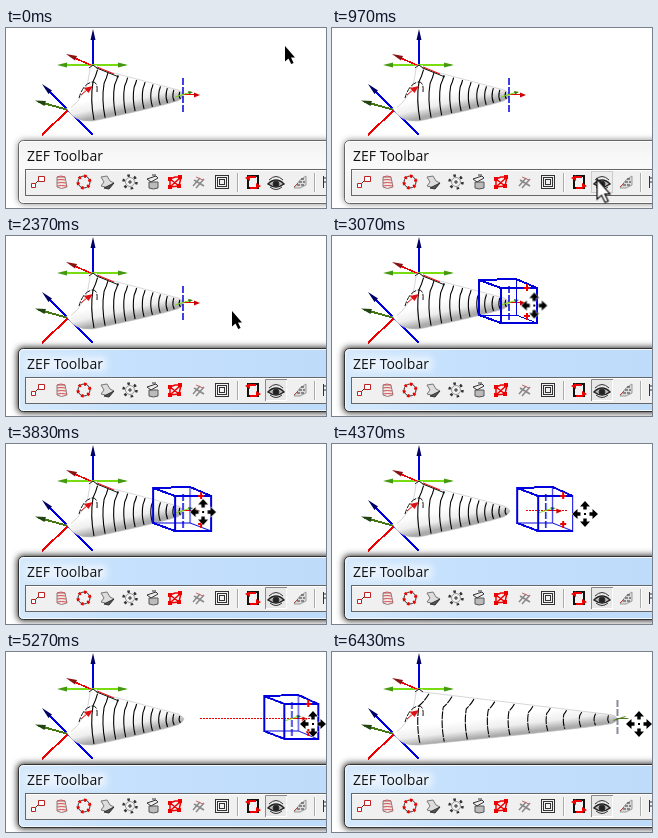
These frames come from a looping animation (320x180 px, 6870 ms). An HTML page:

```html
<!DOCTYPE html>
<html lang="en">
<head>
<meta charset="utf-8">
<title>Toolbar demo</title>
<style>
html, body { margin: 0; width: 100%; height: 100%; overflow: hidden; background: #fff; }
svg { display: block; width: 100vw; height: 100vh; }
text { font: 14px "Open Sans", "Noto Sans", sans-serif; fill: #111; }
.r { stroke: #e00; } .g { stroke: #7d1; } .b { stroke: #00d; } .k { stroke: #111; }
.ln { fill: none; stroke-width: 1; }
.crisp { shape-rendering: crispEdges; }
.ring { fill: none; stroke: #000; stroke-width: 1.1; }
.long .ring { stroke-dasharray: 8 1; }
.anim { animation: 6870ms linear infinite; }
.flip { animation: 6870ms step-end infinite; }

.active { animation-name: active; }
.idle { animation-name: idle; }
.hover { animation-name: hover; }
.pressed { animation-name: pressed; }
.short { animation-name: before; }
.long { animation-name: after; }
.frame { animation-name: frame; }
.dots { animation-name: dots; }
.group { animation-name: slide; transform-origin: 147px 0; }
.pointer { animation-name: pointer; }
.dark { animation-name: dark; }
.light { animation-name: light; }
.move { animation-name: move; }

@keyframes active { 0% { opacity: 0 } 23.29%, 100% { opacity: 1 } }
@keyframes idle { 0% { opacity: 1 } 23.29%, 100% { opacity: 0 } }
@keyframes hover { 0% { opacity: 0 } 10.5% { opacity: 1 } 24.745%, 100% { opacity: 0 } }
@keyframes pressed { 0% { opacity: 0 } 24.745%, 100% { opacity: 1 } }
@keyframes before { 0% { opacity: 1 } 93.595%, 100% { opacity: 0 } }
@keyframes after { 0% { opacity: 0 } 93.595%, 100% { opacity: 1 } }
@keyframes frame { 0% { opacity: 0 } 44.105% { opacity: 1 } 93.595%, 100% { opacity: 0 } }
@keyframes dark { 0% { opacity: 1 } 7.86% { opacity: 0 } 31.08% { opacity: 1 } 44.105%, 100% { opacity: 0 } }
@keyframes light { 0% { opacity: 0 } 7.86% { opacity: 1 } 31.08%, 100% { opacity: 0 } }
@keyframes move { 0% { opacity: 0 } 44.105%, 100% { opacity: 1 } }
/* the group shrinks slightly with distance */
@keyframes slide {
  0%, 55.75% { transform: translate(0, 0) scale(1, 1) }
  63.61%, 64.4% { transform: translate(38px, 0) scale(.96, 1) }
  65.502%, 66.521% { transform: translate(58px, 0) scale(.95, 1) }
  74.236%, 100% { transform: translate(111px, 0) scale(.93, 1) }
}
@keyframes dots {
  0%, 55.75% { width: 0 }
  63.61%, 64.4% { width: 41px }
  65.502%, 66.521% { width: 58px }
  74.236%, 93.594% { width: 110px }
  93.595%, 100% { width: 0 }
}
@keyframes pointer {
  0% { transform: translate(279px, 18px) }
  2.475% { transform: translate(279px, 18px); animation-timing-function: ease-in-out }
  11.208%, 14.1% { transform: translate(266px, 152px) }
  14.119% { transform: translate(265px, 151px) }
  27.656% { transform: translate(265px, 151px); animation-timing-function: ease-in-out }
  34.498%, 34.93% { transform: translate(226px, 75px) }
  37.409%, 37.846% { transform: translate(215px, 75px) }
  39.301%, 44.1% { transform: translate(200px, 71px) }
  44.105% { transform: translate(204px, 70px) }
  46.579%, 55.75% { transform: translate(197px, 68px) }
  63.61%, 64.4% { transform: translate(253px, 70px) }
  65.502%, 66.521% { transform: translate(262px, 70px) }
  74.236%, 100% { transform: translate(307px, 72px) }
}
</style>
</head>
<body>
<svg viewBox="0 0 320 180" preserveAspectRatio="none">
  <defs>
    <linearGradient id="skin" x1="0" y1="0" x2=".42" y2=".84">
      <stop offset=".66" stop-color="#fff"/><stop offset=".85" stop-color="#eee"/><stop offset="1" stop-color="#aaa"/>
    </linearGradient>
    <linearGradient id="glass" x1="0" y1="0" x2="1" y2="0">
      <stop offset="0" stop-color="#d6e9fb"/><stop offset=".35" stop-color="#c4e0fd"/><stop offset="1" stop-color="#bddbfa"/>
    </linearGradient>
    <linearGradient id="pale" x1="0" y1="0" x2="0" y2="1">
      <stop offset="0" stop-color="#f2f2f2"/><stop offset=".4" stop-color="#fafafa"/><stop offset="1" stop-color="#eee"/>
    </linearGradient>
    <filter id="blur" x="-10%" y="-30%" width="120%" height="160%"><feGaussianBlur stdDeviation="3"/></filter>
    <pattern id="dash" x="194" y="66" width="3" height="3" patternUnits="userSpaceOnUse"><path d="M0 0h2v1H0z" fill="#e00"/></pattern>
    <path id="arrow" d="M0 0V15.5L3.500 12.500L6.200 18L8.600 17L6 11.500H10Z"/>
    <path id="spike" d="M0-13L5-7.500H1.700V-4.500H-1.700V-7.500H-5Z"/>
  </defs>
  <rect width="320" height="180" fill="#fff"/>

  <!-- fixed axes behind the solid -->
  <g class="ln crisp">
    <path class="b" stroke-width="2" d="M87 38V8"/>
    <path class="g" stroke-width="2" d="M55 37H119"/>
    <path class="r" stroke-width="1.500" d="M64 28L87 38"/>
    <path class="b" stroke-width="2" d="M40 60L87 107"/>
    <path stroke="#471" stroke-width="2" d="M32 73.5L62 82"/>
    <path class="r" stroke-width="2" d="M36 107L62 82"/>
  </g>
  <path d="M87 1l2.500 11h-5zM36 56l10 6.500-3.500 3.500z" fill="#006"/>
  <path d="M51 37l10-2.500v5zM122 37l-10-2.500v5z" fill="#491"/>
  <path d="M60 26l11 2-2 4.500z" fill="#811"/>
  <path d="M29 72.500l11 .5-1.500 5z" fill="#241"/>

  <g class="flip short" id="short"></g>
  <g class="flip long" id="long"></g>
  <g class="flip short ln">
    <path class="k" d="M87 38.500L113 49"/>
    <path class="r" d="M90 38.500L108 46"/>
  </g>
  <path class="ln k" stroke-dasharray="6 1.500" d="M91 64Q92 53 86 54Q77 56 73 70"/>
  <path class="ln r" stroke-width="1.500" d="M75 67L82 61"/><path d="M87 58l-9 2 4.500 5z" fill="#d11"/>
  <path d="M84 37.500h7v3h-7zM60 80l5-1v6z" fill="#fff"/>
  <path class="ln k" d="M83 40l4-3 4 3"/>

  <rect class="anim dots" x="194" y="66" width="0" height="1" fill="url(#dash)"/>

  <!-- tip axes and their bounding box -->
  <g class="anim group">
    <g class="flip short ln">
      <path class="b" stroke-width="1.500" stroke-dasharray="7 2" d="M177 50V84"/>
      <path class="r" d="M177 66.500H190"/>
      <path class="g" d="M169 69L185 64"/>
      <path d="M194 67l-6-2.500v5z" fill="#c00"/>
      <path d="M182 63l5 1-4 2.500z" fill="#371"/>
    </g>
    <g class="flip long ln">
      <path stroke="#113" stroke-dasharray="7 2" d="M176.500 48V84"/>
      <path stroke="#471" d="M172 68.500L185 64.500M177 66.500H188"/>
    </g>
    <g class="flip frame ln crisp">
      <g class="b" stroke-width="2">
        <path d="M147 44L169 52H205V87H169L147 79ZM169 52V87M147 44L184 43L205 52"/>
        <path d="M184 43V79L205 87M147 79L184 79" stroke-width="1"/>
      </g>
      <path class="r" stroke-width="2" d="M195 48v7M192 52h6M195 77v7M192 80h6"/>
    </g>
  </g>

  <!-- tool window -->
  <rect class="flip idle" x="12" y="112" width="330" height="64" rx="6" fill="#888" filter="url(#blur)"/>
  <rect class="flip active" x="11" y="111" width="330" height="66" rx="6" fill="#333" filter="url(#blur)"/>
  <rect x="12.500" y="112.500" width="330" height="63" rx="5" fill="url(#pale)" stroke="#666"/>
  <rect class="flip active" x="12.500" y="112.500" width="330" height="63" rx="5" fill="url(#glass)" stroke="#333"/>
  <rect x="13.500" y="113.500" width="330" height="61" rx="4" fill="none" stroke="#fff" opacity=".8"/>
  <rect class="flip active" x="20" y="121" width="80" height="14" fill="#e8f3fe" filter="url(#blur)"/>
  <text x="21" y="133">ZEF Toolbar</text>
  <rect x="19.500" y="141.500" width="310" height="26" fill="#f0f0f0" stroke="#666"/>
  <path d="M20 142.500H320" stroke="#fff"/>
  <path d="M231.500 145v19M308.500 145v19" stroke="#aaa"/>
  <path d="M232.500 145v19M309.500 145v19" stroke="#fff"/>
  <rect class="flip hover" x="259.500" y="143.500" width="21" height="21" fill="#ececec" stroke="#ccc"/>
  <g class="flip pressed">
    <rect x="259.500" y="143.500" width="21" height="21" fill="#e8e8e8" stroke="#fff"/>
    <path d="M259.500 165V143.500H281" fill="none" stroke="#888"/>
  </g>

  <g fill="none" stroke="#333">
    <g transform="translate(32 154)"><path d="M-4 3L2-3"/><path stroke="#b22" fill="#fff" d="M-6.500 1.500h4v4h-4zM.5-5.500h6v5h-6z"/></g>
    <g transform="translate(55 154)"><path d="M-4-5L-4 5Q0 8 6 5L4-5Z" fill="#f3e6e6" stroke="#977"/><path stroke="#c55" d="M-4-5Q0-7 4-5M-4-2Q0-3 4-2M-4 1Q0 0 5 1M-4 4Q0 3 6 4"/></g>
    <g transform="translate(78 154)"><circle r="6"/><path class="r" stroke-width="3" stroke-dasharray="2.500 3.780" d="M0-6A6 6 0 1 1-.1-6"/></g>
    <g transform="translate(101 154)"><path d="M-6-5L0-6L3-1L7 1L2 6L-6 4L-3 0Z" fill="#ddd" stroke="#777"/><path d="M-3 6L7 1L2 7z" fill="#555"/></g>
    <g transform="translate(124 154)"><circle r="4.500" stroke="#999"/><circle r="6.500" stroke-width="2.500" stroke-dasharray="2.500 4.300"/><path d="M-2 0h4M0-2v4"/></g>
    <g transform="translate(147 154)"><path d="M-4 0H5V6Q0 8-4 6Z" fill="#bbb" stroke="#555"/><path d="M-6-3L3-6L5-4L-2 0ZM-1-7h4" fill="#eee"/></g>
    <g transform="translate(169 154)"><path class="r" stroke-width="1.500" d="M-5-3L0-5H6L4 4L-5 5ZM-5-3L4 4M6-5L-5 5"/><path d="M-7-5h4v4h-4zM-7 3h4v4h-4zM2 2h4v4H2zM3-7h4v4H3z" fill="#e00" stroke="none"/></g>
    <g transform="translate(193 154)"><path d="M-6 4L1-4M-3 6L5-3M-5-2L5 4" stroke="#888" stroke-width="1.500"/><path stroke="#b66" d="M-3-5l7 3"/></g>
    <g class="crisp" transform="translate(216 154)"><path d="M-6.500-6.500h13v13h-13zM-4.500-4.500h9v9h-9zM-2.500-2.500h5v5h-5z"/></g>
    <g transform="translate(247 154)"><path class="k" stroke-width="2" d="M-5-6H5V6H-5Z"/><path d="M-8-4l5-3v6zM8 4l-5-3v6z" fill="#e00" stroke="none"/><path class="r" stroke-width="2" d="M-4-5H3M-3 6H4"/></g>
    <g transform="translate(270 155)"><path d="M-8 1Q0-7 8 1Q0 7-8 1Z" fill="#bbb" stroke="#222" stroke-width="1.500"/><circle r="3" cy="1" fill="#222"/><path d="M-7-3Q0-10 7-3M-6 4Q0 9 6 4"/></g>
    <g transform="translate(294 154)"><path d="M-6 6L0-2L6-6V3L0 6Z" fill="#ddd" stroke="#999"/><path stroke-dasharray="3 1" d="M-3 3h8M-1 0h6M1-3h4"/><path stroke="#b44" d="M-6 5l4-4"/></g>
    <path d="M317.500 148v12M317.500 150h4M317.500 154h4"/>
  </g>

  <g class="anim pointer">
    <use class="flip dark" href="#arrow" fill="#000"/>
    <g class="flip light"><use href="#arrow" transform="scale(1.300)" fill="#fff" stroke="#000" stroke-width=".9"/></g>
    <g class="flip move" stroke="#fff" stroke-width="1" paint-order="stroke">
      <use href="#spike"/><use href="#spike" transform="rotate(90)"/>
      <use href="#spike" transform="rotate(180)"/><use href="#spike" transform="rotate(270)"/>
      <path d="M-1-1h2v2h-2z"/>
    </g>
  </g>
</svg>
<script>
// Tapered solid with a rounded end at x = tip, and its section rings.
function solid(id, tip) {
  const left = 87, span = tip - left;
  const round = x => 3.5 * Math.sqrt(Math.min(1, Math.max(0, tip - x) / 6));
  const top = x => 43 + 24 * (x - left) / span - round(x);
  const low = x => 67 + round(x) + 22.5 * Math.pow(Math.max(0, tip - x) / span, 0.85);
  const upper = [], lower = [];
  for (let i = 0; i <= 60; i++) {
    const x = left + span * i / 60;
    upper.push(x + " " + top(x));
    lower.unshift(x + " " + low(x));
  }
  let out = `<path fill="url(#skin)" stroke="#bbb" stroke-width=".6" d="M${upper.join("L")}L${lower.join("L")}Q68 94 62 82Q82 68 84 41Z"/>`;
  for (let i = 0; i <= 10; i++) {
    const u = 0.125 * i - 0.003 * i * i, x = left + span * u;
    const hook = span * 0.05 * (1 - u), a = top(x + hook), b = low(x), h = b - a;
    out += `<path class="ring" d="M${x + hook} ${a + 1}Q${x + hook * 0.6} ${a + h * 0.15} ${x} ${a + h * 0.25}Q${x - 2 * (1 - u) - 1} ${a + h * 0.6} ${x + 1} ${b - 1}"/>`;
  }
  document.getElementById(id).innerHTML = out;
}
solid("short", 178);
solid("long", 286);
</script>
</body>
</html>
```
